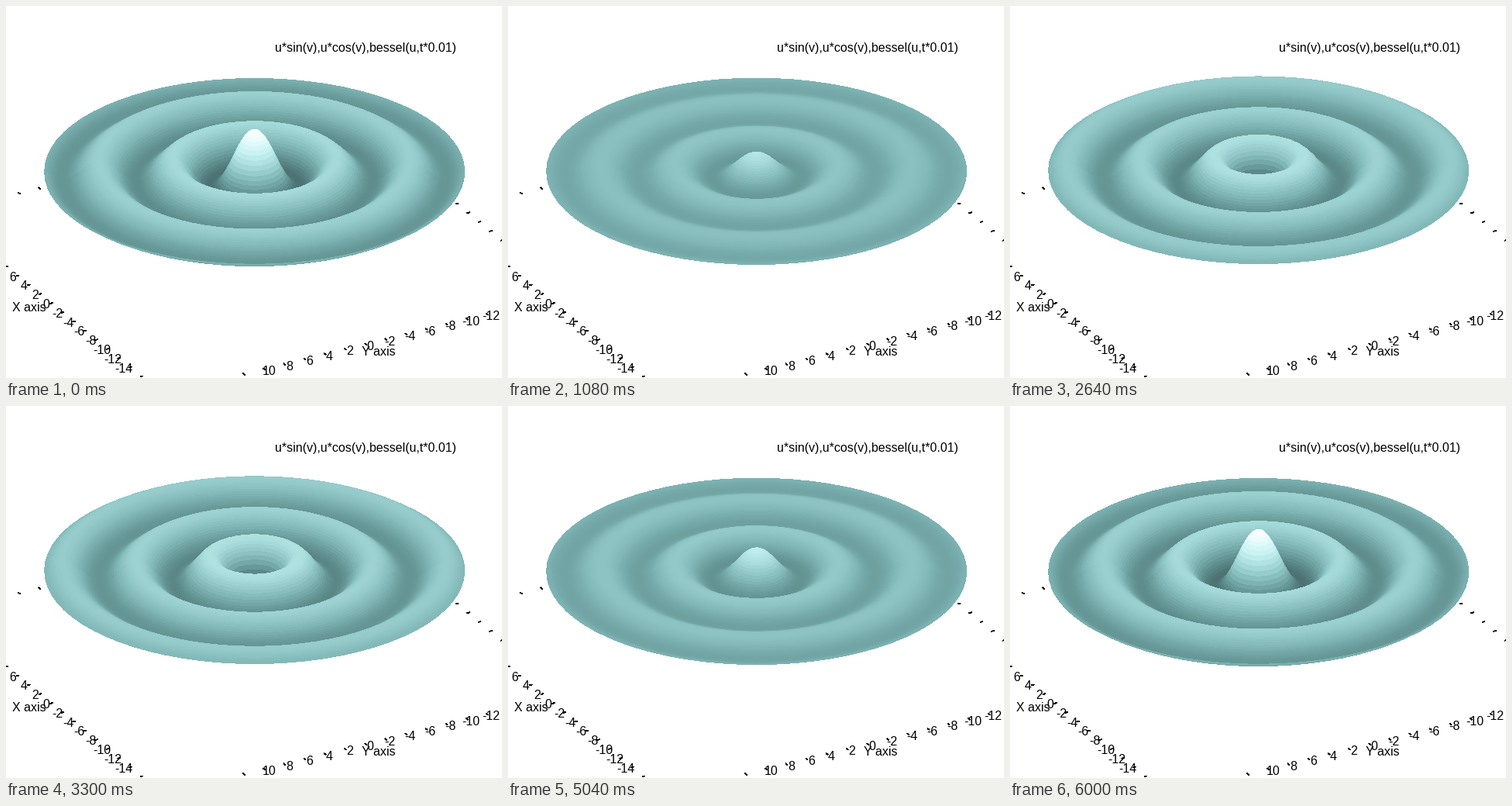
These frames come from a looping animation (640 by 480 pixels, 6.06 s). A matplotlib script:

```python
import numpy as np
import matplotlib.pyplot as plt
from matplotlib.animation import FuncAnimation
from matplotlib.collections import LineCollection, PolyCollection

W, H = 640, 480
FRAMES, STEP_MS = 101, 60
CX, CY = 320.7, 213.0            # screen position of the surface centre
SX, SY, SZ = 15.04, 6.66, 52.6   # pixels per unit: across, in depth, in height
RADIUS, RINGS, SECTORS = 18.0, 100, 72

plt.rcParams["font.family"] = "Liberation Sans"
fig = plt.figure(figsize=(W / 100, H / 100), dpi=100, facecolor="white")
ax = fig.add_axes([0, 0, 1, 1])
ax.set_xlim(0, W)
ax.set_ylim(H, 0)
ax.axis("off")


def bessel0(u):
    theta = (np.arange(200) + 0.5) * np.pi / 200
    return np.cos(np.outer(u, np.sin(theta))).mean(axis=1)


def label(x, y, s, ha="center"):
    ax.text(x, y, s, fontsize=11.52, color="black", ha=ha, va="baseline", zorder=3)


# Axis ticks, each drawn along the direction of the other axis
def tick(x, y, dx, dy):
    return [(x - dx, y - dy), (x + dx, y + dy)]


ALONG_X, ALONG_Y = (1.1, 0.9), (1.7, -0.5)
ticks = [tick(58.5 - 7.27 * v, 383.5 - 5.9 * v, *ALONG_Y) for v in range(-16, 9, 2)]
ticks += [tick(464 - 13.08 * v, 436.3 + 3.22 * v, *ALONG_X) for v in range(-12, 13, 2)]
ticks += [tick(582 + 14.5 * i, 255 + 11.8 * i, *ALONG_Y) for i in range(5)]
ticks += [tick(17 + 26.2 * i, 241.5 - 6.5 * i, *ALONG_X) for i in range(2)]
marks = LineCollection(ticks, colors="black", linewidths=0.55,
                       antialiaseds=False, zorder=1)
marks.set_snap(False)
ax.add_collection(marks)

for v in range(-14, 7, 2):
    label(51.7 - 7.17 * v, 390 - 5.9 * v, str(v))
for v in range(-12, 11, 2):
    label(469.5 - 13.02 * v, 444 + 3.22 * v, str(v))
label(8, 394, "X axis", "left")
label(459, 451, "Y axis", "left")
label(347, 59, "u*sin(v),u*cos(v),bessel(u,t*0.01)", "left")

# Polar mesh, its quads sorted from far to near
u = np.linspace(0, RADIUS, RINGS + 1)
v = np.linspace(0, 2 * np.pi, SECTORS + 1)
U, V = np.meshgrid(u, v, indexing="ij")
px, depth = U * np.sin(V), U * np.cos(V)
wave = np.repeat(bessel0(u)[:, None], SECTORS + 1, axis=1)


def quads(a):
    corners = (a[:-1, :-1], a[1:, :-1], a[1:, 1:], a[:-1, 1:])
    return np.stack(corners, axis=-1).reshape(-1, 4)


order = np.argsort(-quads(depth).mean(axis=1), kind="stable")
qx = CX + SX * quads(px)[order]
qy = CY - SY * quads(depth)[order]
qz = quads(wave)[order]
qmid = qz.mean(axis=1)

LEVELS = [-0.4, -0.2, 0, 0.3, 0.6, 1]
RED = [76, 101, 127, 166, 202, 255]
CYAN = [114, 149, 181, 218, 244, 255]


def shade(z):
    r = np.interp(z, LEVELS, RED)
    g = np.interp(z, LEVELS, CYAN)
    return np.column_stack([r, g, g]) / 255


def shape(amp):
    return np.stack([qx, qy - SZ * amp * qz], axis=-1)


surface = PolyCollection(shape(1), facecolors=shade(qmid), edgecolors="face",
                         linewidths=0.45, antialiaseds=False, zorder=2)
surface.set_snap(False)
ax.add_collection(surface, autolim=False)


def update(i):
    amp = np.cos(2 * np.pi * i * 0.01)
    surface.set_verts(shape(amp))
    surface.set_facecolor(shade(amp * qmid))
    return [surface]


anim = FuncAnimation(fig, update, frames=FRAMES, interval=STEP_MS,
                     repeat=True, repeat_delay=0, blit=False)
plt.show()
```
